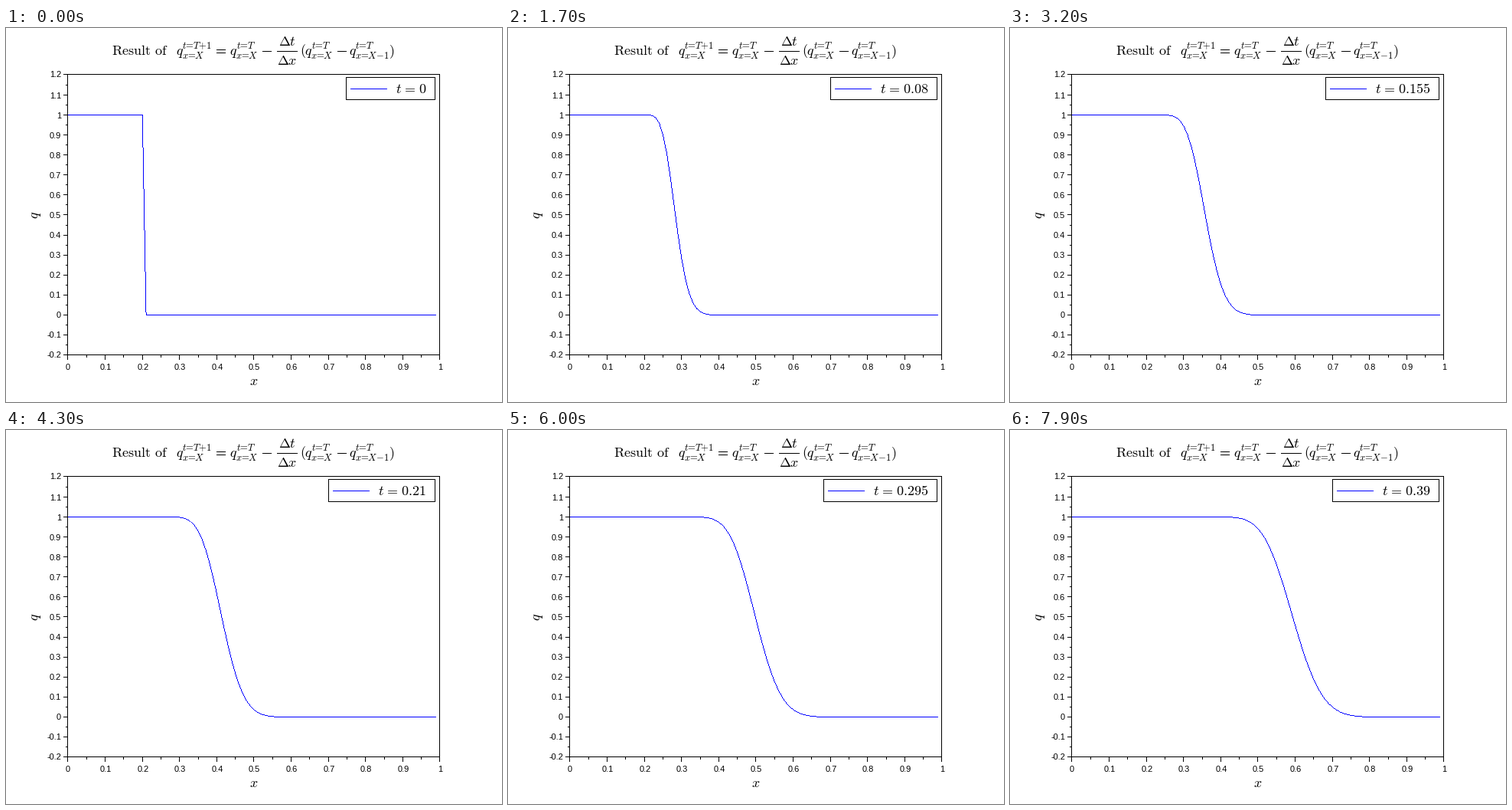
Animation, 648 px wide and 488 px high, one loop 8 s. Source, as a matplotlib script:

```python
import math

import matplotlib.pyplot as plt
import numpy as np
from matplotlib.animation import FuncAnimation
from matplotlib.patches import Rectangle

W, H, DPI = 648, 488, 64
PX = 72 / DPI                                # one pixel in points
LEFT, TOP, PW, PH = 81, 61, 486, 366         # plot area
FRAMES, INTERVAL = 80, 100
DX, DT, STEPS = 0.01, 0.00001, 500           # grid, time step, steps per frame
BLUE = "#0000ff"
TIGHT_EQ = r"\hspace{-0.2}=\hspace{-0.2}"    # equals sign without side space

plt.rcParams.update({"mathtext.fontset": "cm", "font.family": "Liberation Sans"})

fig = plt.figure(figsize=(W / DPI, H / DPI), dpi=DPI, facecolor="white")
ax = fig.add_axes([0, 0, 1, 1])
ax.axis("off")


def bar(x, y, w, h, color="black"):
    return ax.add_patch(Rectangle((x, y), w, h, fc=color, lw=0, zorder=2))


def box(x0, y0, x1, y1):
    """One-pixel outline given by its corner pixels."""
    return (bar(x0, y0, x1 - x0 + 1, 1), bar(x0, y1, x1 - x0 + 1, 1),
            bar(x0, y0, 1, y1 - y0 + 1), bar(x1, y0, 1, y1 - y0 + 1))


def tex(x, y, s, size=18, **kw):
    kw = {"ha": "left", "va": "baseline", **kw}
    return ax.text(x, y, f"${s}$", fontsize=size * PX, **kw)


def label(x, y, value, ha):
    ax.text(x, y, f"{value:g}", fontsize=11 * PX, ha=ha, va="baseline")


def pixel(v):
    return math.ceil(v - 1e-6) - 1


def q_term(x, sup, sub):
    tex(x, 35, "q")
    tex(x + 8.5, 27, sup.replace("=", TIGHT_EQ), 12.6)
    tex(x + 8, 40, sub.replace("=", TIGHT_EQ), 12.6)


def draw_title():
    tex(138.5, 35, r"\mathrm{Result}")
    tex(194, 35, r"\mathrm{of}")
    q_term(221.5, "t=T{+}1", "x=X")
    for y in (28, 32):
        bar(275, y, 12, 1)
    q_term(292.5, "t=T", "x=X")
    bar(335, 30, 12, 1)
    tex(367, 23, r"\Delta t", ha="center")
    bar(354, 30, 27, 1)
    tex(367, 47.5, r"\Delta x", ha="center")
    tex(384.3, 35, "(")
    q_term(390.5, "t=T", "x=X")
    bar(433, 30, 12, 1)
    q_term(448, "t=T", "x=X{-}1")
    tex(500, 35, ")")


def draw_axes():
    box(80, 60, 566, 426)
    for k in range(21):
        x = pixel(LEFT + PW * k / 20)
        bar(x, 427, 1, 3 if k % 2 else 6)
        if k % 2 == 0:
            label(x + 1, 446, k / 20, "center")
    for k in range(29):
        y = pixel(TOP + PH * k / 28)
        size = 2 if k % 2 else 5
        bar(80 - size, y, size, 1)
        if k % 2 == 0:
            label(72.2, y + 4.5, (12 - k // 2) / 10, "right")
    tex(324, 466, "x", ha="center")
    tex(39, 243.5, "q", ha="center", va="center", rotation=90)


def solve():
    """Upwind advection of a step, one profile per shown time."""
    q = np.where(np.arange(100) <= 20, 1.0, 0.0)
    out = [q.copy()]
    for _ in range(FRAMES - 2):
        for _ in range(STEPS):
            q[1:] -= DT / DX * (q[1:] - q[:-1])
        out.append(q.copy())
    return out


def trace(q):
    """Crisp one-pixel polyline of a falling profile."""
    img = np.zeros((H, W, 4), np.uint8)
    xs = LEFT + PW * DX * np.arange(len(q))
    ys = TOP + PH * (1.2 - q) / 1.4
    for x0, y0, x1, y1 in zip(xs, ys, xs[1:], ys[1:]):
        if y1 - y0 <= x1 - x0:
            col = np.arange(math.ceil(x0 - 0.5), math.ceil(x1 - 0.5))
            row = np.floor(y0 + (col + 0.5 - x0) * (y1 - y0) / (x1 - x0)).astype(int)
        else:
            row = np.arange(math.ceil(y0 - 0.5), math.ceil(y1 - 0.5))
            col = np.floor(x0 + (row + 0.5 - y0) * (x1 - x0) / (y1 - y0)).astype(int)
        img[row, col] = (0, 0, 255, 255)
    return img


draw_title()
draw_axes()
profiles = solve()
curve = ax.imshow(trace(profiles[0]), extent=(0, W, H, 0), aspect="auto",
                  interpolation="nearest", zorder=3)
ax.set_xlim(0, W)
ax.set_ylim(H, 0)

top, bottom, side, right = box(444, 64, 560, 93)
key = bar(450, 79, 48, 1, BLUE)
time_text = tex(0, 85, "t")


def update(i):
    n = max(0, i - 1)
    value = f"{n * DT * STEPS:.6g}"
    digits = len(value.replace(".", ""))
    x = 444 - 9 * (digits - 1) - (5 if "." in value else 0)
    for edge in (top, bottom):
        edge.set_x(x)
        edge.set_width(561 - x)
    side.set_x(x)
    key.set_x(x + 6)
    time_text.set_x(x + 65)
    time_text.set_text(rf"$t\hspace{{0.115}}=\hspace{{0.115}}{value}$")
    curve.set_data(trace(profiles[n]))
    return curve, top, bottom, side, key, time_text


anim = FuncAnimation(fig, update, frames=FRAMES, interval=INTERVAL,
                     init_func=lambda: update(0), repeat=True, repeat_delay=0)
plt.show()
```
